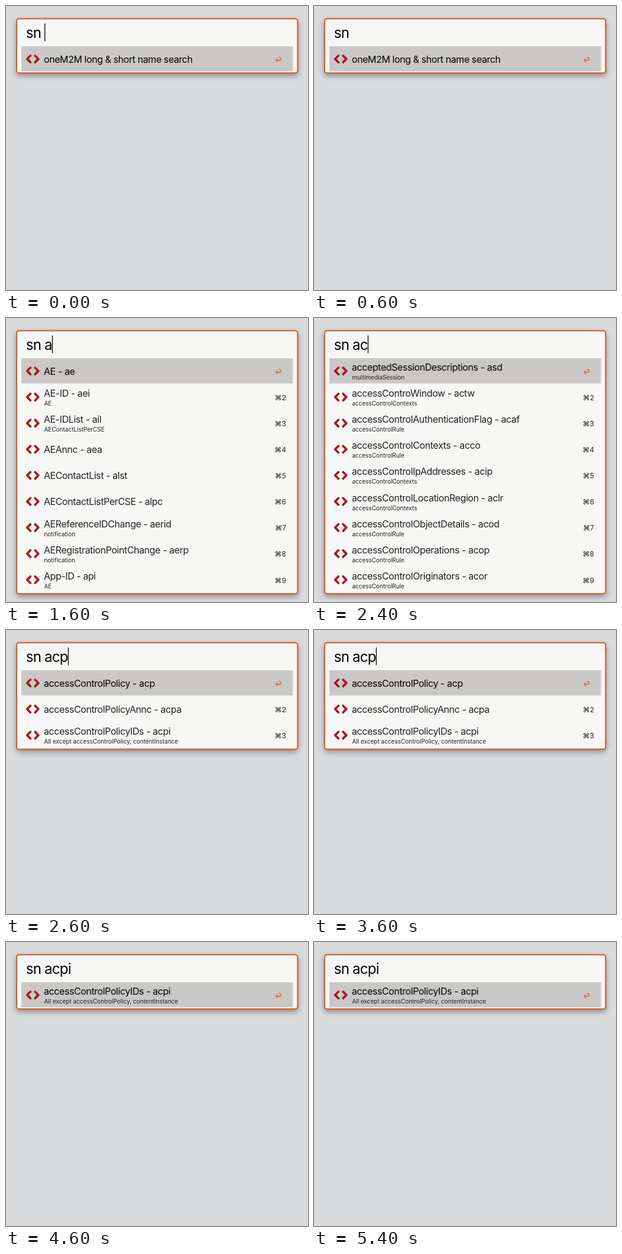
Write an HTML page that moves like this. It is 511x480 px and loops after 5600 ms.

```html
<!DOCTYPE html>
<html lang="en">
<head>
<meta charset="utf-8">
<title>Name search</title>
<style>
  html, body { margin: 0; height: 100%; overflow: hidden; background: #d9dadc; }
  svg { display: block; width: 100vw; height: 100vh; }
  text { font-family: Inter, "DejaVu Sans", sans-serif; font-feature-settings: "calt" 0; white-space: pre; fill: #222; }
  #query { font-size: 24.2px; letter-spacing: -.85px; fill: #000; }
  .title { font-size: 16px; letter-spacing: -.42px; }
  .selected { fill: #000; }
  .sub { font-size: 10px; }
  .key { font-size: 12px; text-anchor: end; }
  #panel { fill: #f7f7f5; stroke: #d9541e; stroke-width: 2; filter: drop-shadow(0 4px 5px rgba(0, 0, 0, .35)); }
  .icon, .return { fill: none; stroke-linecap: round; stroke-linejoin: round; }
  .icon { stroke: #a61c22; stroke-width: 3.8; }
  .return { stroke: #e8501e; stroke-width: 1.2; }
</style>
</head>
<body>
<svg viewBox="0 0 511 480">
  <rect id="panel" x="18" y="21.5" width="475.5" rx="4"/>
  <rect x="26" y="68" width="459.5" height="42.5" fill="#cac8c6"/>
  <text id="query" x="33.8" y="54"></text>
  <rect id="caret" y="29.5" width="1.3" height="30"/>
  <g id="rows"></g>
</svg>
<script>
const LOOP = 5600, PITCH = 44.1;
const rule = "accessControlRule", contexts = "accessControlContexts";
const policyIds = ["accessControlPolicyIDs - acpi", "All except accessControlPolicy, contentInstance"];

// blink: time at which the caret's one-second cycle restarts
const steps = [
  { at: 0, blink: -100, query: "sn ", rows: [["oneM2M long & short name search"]] },
  { at: 1600, blink: 1600, query: "sn a", rows: [
    ["AE - ae"],
    ["AE-ID - aei", "AE"],
    ["AE-IDList - ail", "AEContactListPerCSE"],
    ["AEAnnc - aea"],
    ["AEContactList - alst"],
    ["AEContactListPerCSE - alpc"],
    ["AEReferenceIDChange - aerid", "notification"],
    ["AERegistrationPointChange - aerp", "notification"],
    ["App-ID - api", "AE"]] },
  { at: 2200, blink: 2200, query: "sn ac", rows: [
    ["acceptedSessionDescriptions - asd", "multimediaSession"],
    ["accessControWindow - actw", contexts],
    ["accessControlAuthenticationFlag - acaf", rule],
    ["accessControlContexts - acco", rule],
    ["accessControlIpAddresses - acip", contexts],
    ["accessControlLocationRegion - aclr", contexts],
    ["accessControlObjectDetails - acod", rule],
    ["accessControlOperations - acop", rule],
    ["accessControlOriginators - acor", rule]] },
  { at: 2600, blink: 2600, query: "sn acp", rows: [
    ["accessControlPolicy - acp"],
    ["accessControlPolicyAnnc - acpa"],
    policyIds] },
  { at: 3800, blink: 3800, query: "sn acpi", rows: [policyIds] },
];

const [panel, query, caret, rows] = ["panel", "query", "caret", "rows"].map(id => document.getElementById(id));
const label = (cls, x, y, str) => `<text class="${cls}" x="${x}" y="${y}">${str.replace("&", "&amp;")}</text>`;

function rowMarkup([title, sub], i) {
  const shortcut = i
    ? label("key", 474, 138.9 - PITCH, "⌘" + (i + 1))
    : '<path class="return" d="M459.5 88.8l-2.8 2.8 2.8 2.8M456.7 91.6h6.8a2.2 2.2 0 0 0 0-4.4h-1.3"/>';
  return `<g transform="translate(0 ${i * PITCH})">
    <path class="icon" d="M41.3 84l-5.6 5.6 5.6 5.6M49.2 84l5.6 5.6-5.6 5.6"/>
    ${label(i ? "title" : "title selected", 64, sub ? 89 : 95.5, title)}
    ${sub ? label("sub", 64.4, 104, sub) : ""}${shortcut}</g>`;
}

let shown;
function show(step) {
  shown = step;
  query.textContent = step.query;
  rows.innerHTML = step.rows.map(rowMarkup).join("");
  panel.setAttribute("height", 91.8 + (step.rows.length - 1) * PITCH);
}

function draw() {
  const t = performance.now() % LOOP;
  const step = steps.findLast(s => s.at <= t);
  if (step !== shown) show(step);
  caret.setAttribute("x", 33.8 + query.getComputedTextLength());
  caret.setAttribute("visibility", (t - step.blink) % 1000 < 500 ? "visible" : "hidden");
  requestAnimationFrame(draw);
}
draw();
</script>
</body>
</html>
```
